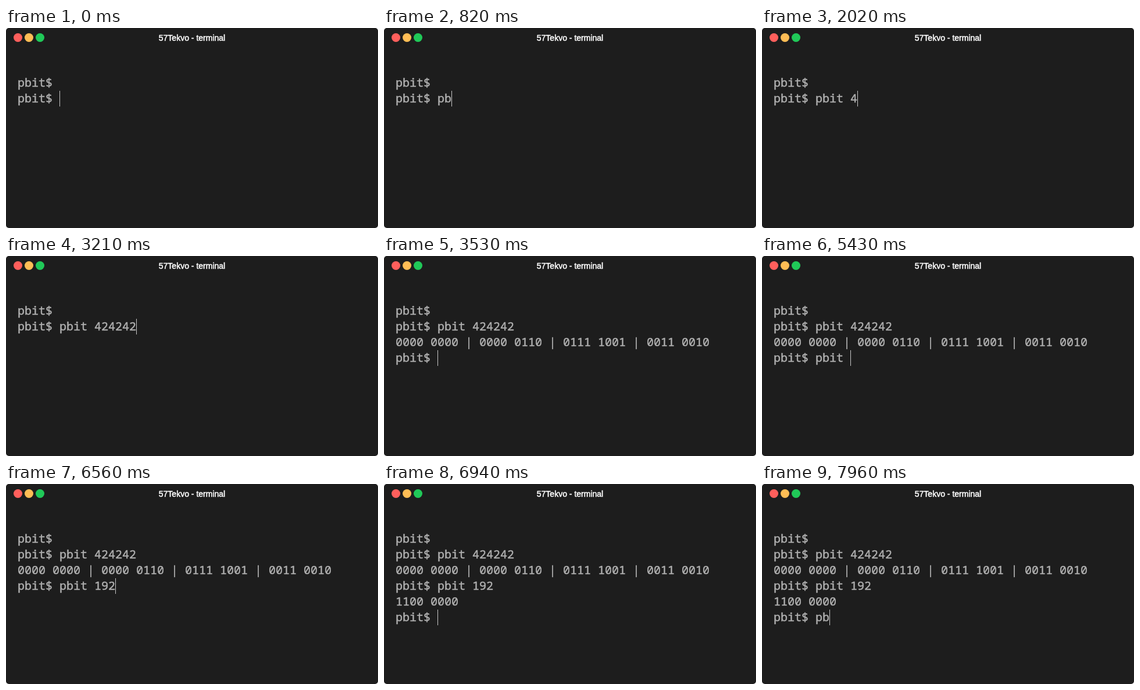
An HTML page for the animation above (8000 ms loop, 640x344 px).

```html
<!DOCTYPE html>
<html lang="en">
<head>
<meta charset="utf-8">
<title>Terminal</title>
<style>
  html, body { margin: 0; width: 100%; height: 100%; overflow: hidden; background: #fff; }
  #window { position: relative; width: 640px; height: 344px; border-radius: 5px; background: #1d1d1d; overflow: hidden; }
  .button { position: absolute; top: 9px; width: 15px; height: 15px; border-radius: 50%; }
  #title { position: absolute; top: 9px; width: 100%; text-align: center; color: #fff;
    font: 14px/16px "Liberation Sans", Arial, sans-serif; -webkit-text-stroke: 0.5px #fff; }
  #screen { position: absolute; left: 20px; top: 80px; margin: 0; color: #afafaf;
    font: 20px/27px "Noto Sans Mono", monospace; font-variant-ligatures: none;
    -webkit-text-stroke: 0.5px #afafaf; }
  #cursor { position: absolute; width: 1px; height: 27px; background: #c8c8c8; }
</style>
</head>
<body>
<div id="window">
  <div class="button" style="left:13px;background:#ff5f5c"></div>
  <div class="button" style="left:32px;background:#ffbd55"></div>
  <div class="button" style="left:51px;background:#20c958"></div>
  <div id="title">57Tekvo - terminal</div>
  <pre id="screen"></pre>
  <div id="cursor"></div>
</div>
<script>
const LOOP = 8000, CELL = 12, ROW = 27, LEFT = 20, TOP = 81;
const PROMPT = "pbit$ ";
const screen = document.getElementById("screen");
const cursor = document.getElementById("cursor");

// Each command: key press times, then the time its output appears.
const commands = [
  { text: "pbit 424242", keys: [580, 730, 830, 940, 1150, 2020, 2160, 2340, 2730, 3090, 3210],
    enter: 3530, output: "0000 0000 | 0000 0110 | 0111 1001 | 0011 0010" },
  { text: "pbit 192", keys: [4910, 5080, 5180, 5280, 5430, 6170, 6290, 6560],
    enter: 6940, output: "1100 0000" },
  { text: "pb", keys: [7810, 7960], enter: Infinity }
];

function linesAt(time) {
  const lines = [PROMPT];
  for (const { text, keys, enter, output } of commands) {
    const typed = keys.filter(key => key <= time).length;
    lines.push(PROMPT + text.slice(0, typed));
    if (time < enter) break;
    lines.push(output);
  }
  return lines;
}

let shown;
function draw() {
  const lines = linesAt(performance.now() % LOOP);
  const text = lines.join("\n");
  if (text !== shown) {
    shown = screen.textContent = text;
    cursor.style.left = LEFT + lines.at(-1).length * CELL + "px";
    cursor.style.top = TOP + (lines.length - 1) * ROW + "px";
  }
  requestAnimationFrame(draw);
}
draw();
</script>
</body>
</html>
```
